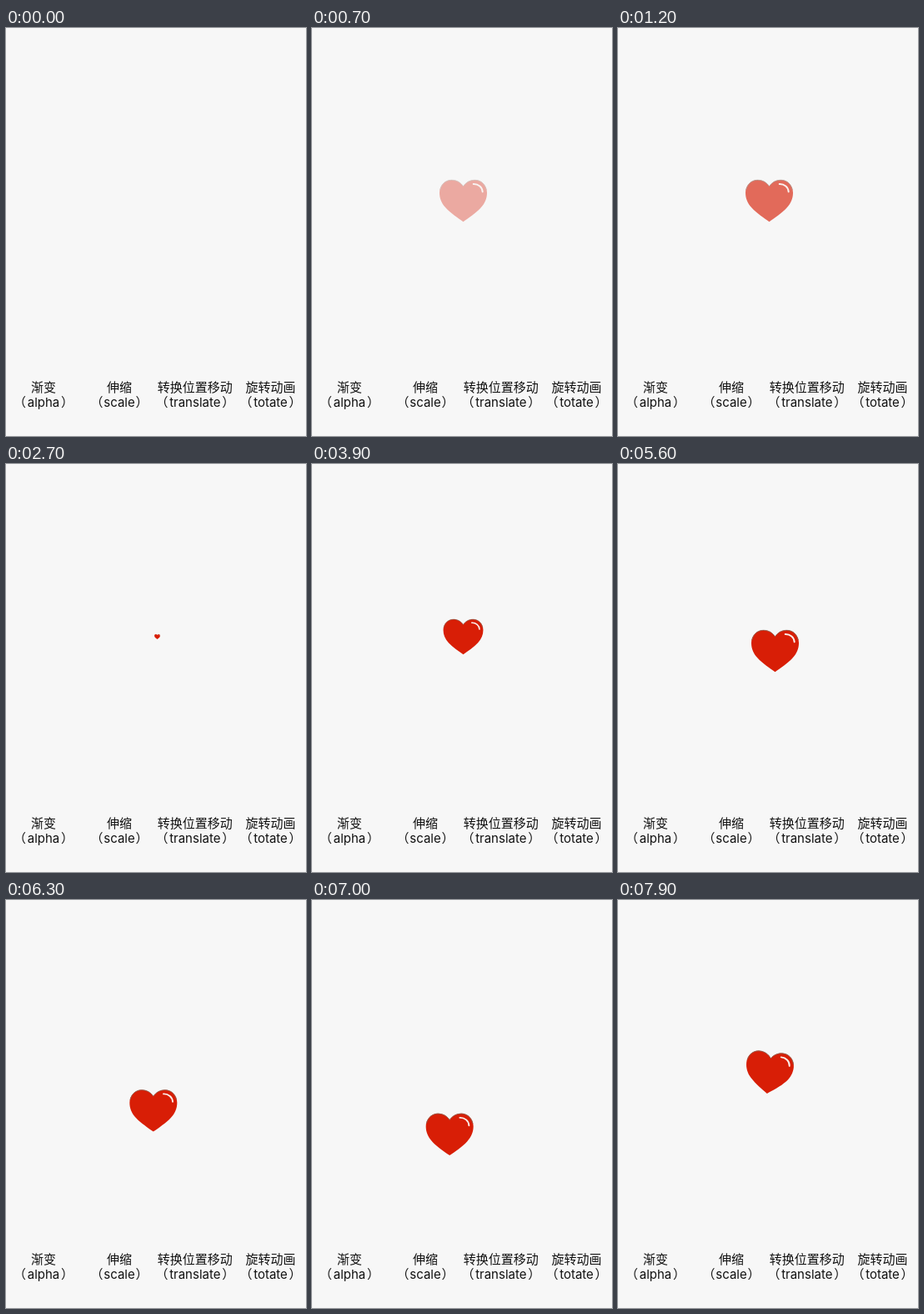
Animation, 360 px wide and 489 px high, one loop 8000 ms. Source, as an HTML page:

```html
<!DOCTYPE html>
<html lang="zh-CN">
<head>
<meta charset="utf-8">
<title>Heart animations</title>
<style>
  html, body { margin: 0; width: 100%; height: 100%; overflow: hidden; background: #f7f7f7; }
  svg { display: block; width: 360px; height: 489px; }
  text { font-size: 15px; text-anchor: middle; fill: #111; }
  .zh { font-family: "Noto Sans CJK SC", "Noto Sans CJK", sans-serif; }
  .en { font-family: Inter, Roboto, sans-serif; }
</style>
</head>
<body>
<svg viewBox="0 0 360 489" xmlns="http://www.w3.org/2000/svg">
  <g id="heart">
    <path fill="#d81e06" d="M0 25.2C-6 21-15 15-21 8.6C-26 3.4-28.5-2.8-28.5-9.5C-28.5-18.5-22-25-14-25C-8-25-3-22 0-17.5C3-22 8-25 14-25C22-25 28.5-18.5 28.5-9.5C28.5-2.8 26 3.4 21 8.6C15 15 6 21 0 25.2Z"/>
    <path fill="none" stroke="#8a6a5c" stroke-width=".8" d="M-27.8-13C-26-20.5-20.5-24.7-14-24.7C-8-24.7-3-21.8 0-17.2C3-21.8 8-24.7 14-24.7C20.5-24.7 26-20.5 27.8-13"/>
    <path fill="none" stroke="#fbeeea" stroke-width="1.9" stroke-linecap="round" d="M12.2-20C18-20.2 23-16.2 23.2-10.6"/>
  </g>
  <g id="labels"></g>
</svg>
<script>
const LOOP = 8000, STEP = 100;
const CX = 181.5, CY = 207;

// Chinese label, English label, centre x, distance from centre to each bracket
const labels = [
  ['渐变', 'alpha', 45, 24.3],
  ['伸缩', 'scale', 136, 22.7],
  ['转换位置移动', 'translate', 226.8, 35.7],
  ['旋转动画', 'totate', 317.5, 25.2]
];
const ROW_1 = 435.8, ROW_2 = 454;

// Full-width brackets sit off-centre in their em box
const BRACKET_SHIFT = 4.2;

function addText(cls, x, y, str) {
  const el = document.createElementNS('http://www.w3.org/2000/svg', 'text');
  el.setAttribute('class', cls);
  el.setAttribute('x', x);
  el.setAttribute('y', y);
  el.textContent = str;
  document.getElementById('labels').append(el);
}

for (const [zh, en, x, gap] of labels) {
  addText('zh', x, ROW_1, zh);
  addText('en', x, ROW_2, en);
  addText('zh', x - gap - BRACKET_SHIFT, ROW_2, '（');
  addText('zh', x + gap + BRACKET_SHIFT, ROW_2, '）');
}

const heart = document.getElementById('heart');

// Linear tweens; between them the heart rests at its normal pose
const tweens = [
  { from: 0, to: 1800, pose: t => ({ alpha: Math.max(0, (t - 100) / 1700) }) },
  { from: 2500, to: 4850, pose: t => ({ scale: (t - 2500) * 0.0006 }) },
  { from: 5200, to: 7510, pose: t => ({ dx: 7 - (t - 5600) / 60, dy: 17 + (t - 5600) * 0.0406 }) },
  { from: 7860, to: LOOP, pose: t => ({ angle: (t - 7860) * 360 / 2350 }) }
];

function draw(t) {
  const active = tweens.find(w => t >= w.from && t < w.to);
  const { alpha = 1, scale = 1, dx = 0, dy = 0, angle = 0 } = active ? active.pose(t) : {};
  heart.setAttribute('opacity', alpha);
  heart.setAttribute('transform',
    `translate(${CX + dx} ${CY + dy}) rotate(${angle}) scale(${scale})`);
}

let start;
function tick(now) {
  start ??= now;
  // The small lead keeps rounding from falling one step behind
  const t = Math.floor((now - start + 20) / STEP) * STEP;
  draw(t % LOOP);
  requestAnimationFrame(tick);
}

draw(0);
requestAnimationFrame(tick);
</script>
</body>
</html>
```
